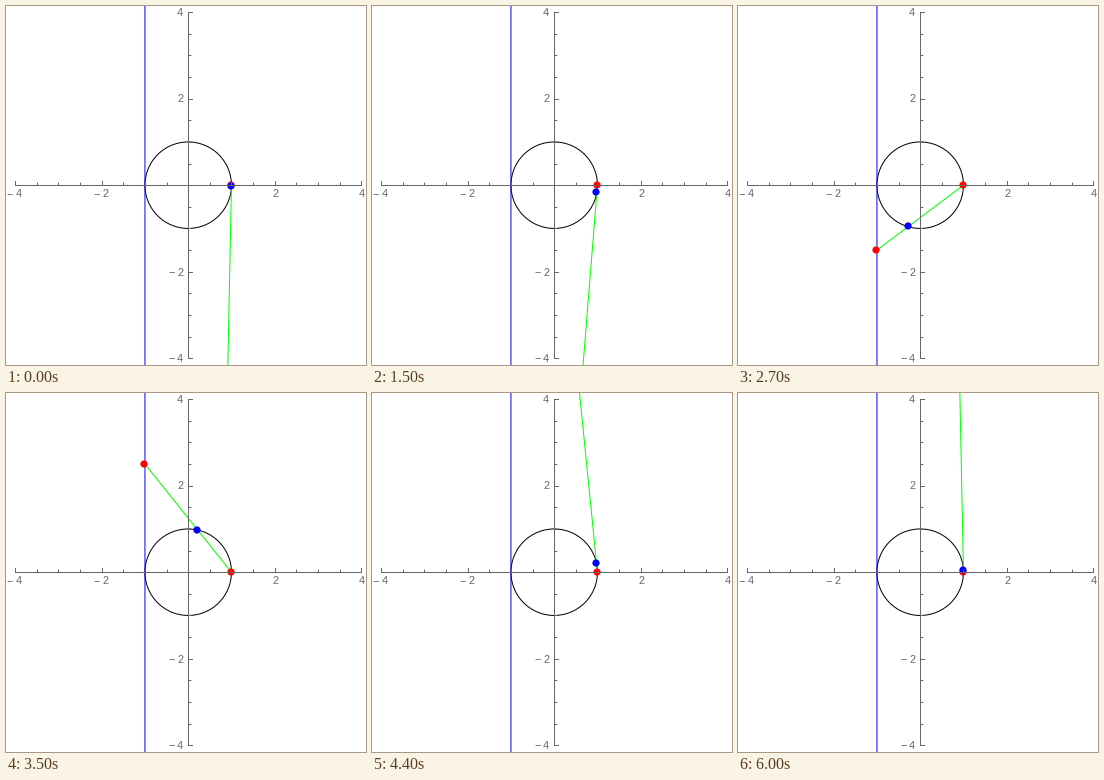
A matplotlib script that plays this animation: 360x359 px, repeating every 6.1 s.

```python
import numpy as np
import matplotlib.pyplot as plt
from matplotlib.animation import FuncAnimation
from matplotlib.patches import Circle

W, H, DPI = 360, 359, 64
PX = 72 / DPI                      # points per pixel
CX, CY, UNIT = 182.2, 179.2, 43.25  # plot origin and scale in pixels
GRAY = "#666666"
AXES_Z = 6

# Height of the point on the line x = -1: coarse, fine, coarse steps
HEIGHTS = np.concatenate([
    np.arange(-100, 0, 5),
    np.linspace(-5, 5, 21),
    np.arange(5, 101, 5),
])


def to_px(x, y):
    return CX + UNIT * x, CY - UNIT * y


def dot_px(x, y):
    """Dots sit on whole pixels."""
    return tuple(np.floor(to_px(x, y)))


def pixel_px(x, y):
    """Centre of the pixel nearest to a plot position."""
    return tuple(np.round(to_px(x, y)) + 0.5)


fig = plt.figure(figsize=(W / DPI, H / DPI), dpi=DPI, facecolor="white")
ax = fig.add_axes([0, 0, 1, 1])
ax.set_xlim(0, W)
ax.set_ylim(H, 0)
ax.axis("off")


def stroke(xs, ys, color, z):
    return ax.plot(xs, ys, color=color, lw=PX, zorder=z, snap=False)[0]


def label(x, baseline, text):
    ax.text(x, baseline, text, family="Liberation Sans", size=11 * PX,
            color=GRAY, ha="center", va="baseline", zorder=AXES_Z)


def draw_axes():
    x0, y0 = pixel_px(0, 0)
    left, bottom = pixel_px(-4, -4)
    right, top = pixel_px(4, 4)
    stroke([left, right], [y0, y0], GRAY, AXES_Z)
    stroke([x0, x0], [top, bottom], GRAY, AXES_Z)
    for v in np.arange(-4, 4.1, 0.5):
        if v == 0:
            continue
        x, y = pixel_px(v, v)
        major = v % 2 == 0
        size = 4 if major else 2.4
        stroke([x, x], [y0, y0 - size], GRAY, AXES_Z)
        stroke([x0, x0 + size], [y, y], GRAY, AXES_Z)
        if not major:
            continue
        digit = str(abs(int(v)))
        label(x + (3 if v < 0 else 0), 191, digit)
        label(174.2, y + 3, digit)
        if v < 0:
            label(x - 6, 191, "\u2212")
            label(166, y + 3, "\u2212")


def add_dot(color, z):
    dot = Circle((0, 0), 3.6, facecolor=color, edgecolor="none", zorder=z)
    return ax.add_patch(dot)


draw_axes()
ax.add_patch(Circle((CX, CY), UNIT, fill=False, edgecolor="black",
                    lw=PX, zorder=2))
line_x = to_px(-1, 0)[0]
stroke([line_x, line_x], [-5, H + 5], "#0000ff", 2)

chord = stroke([], [], "#00ff00", 3)
pole = add_dot("#ff0000", 4)
target = add_dot("#ff0000", 4)
image = add_dot("#0000ff", 5)
pole.center = dot_px(1, 0)


def update(i):
    t = HEIGHTS[i]
    # Second intersection of the chord with the unit circle
    x, y = (t * t - 4) / (t * t + 4), 4 * t / (t * t + 4)
    chord.set_data(*zip(to_px(1, 0), to_px(-1, t)))
    target.center = dot_px(-1, t)
    image.center = dot_px(x, y)
    return chord, target, image


anim = FuncAnimation(fig, update, frames=len(HEIGHTS), interval=100,
                     repeat=True, repeat_delay=0)
plt.show()
```
